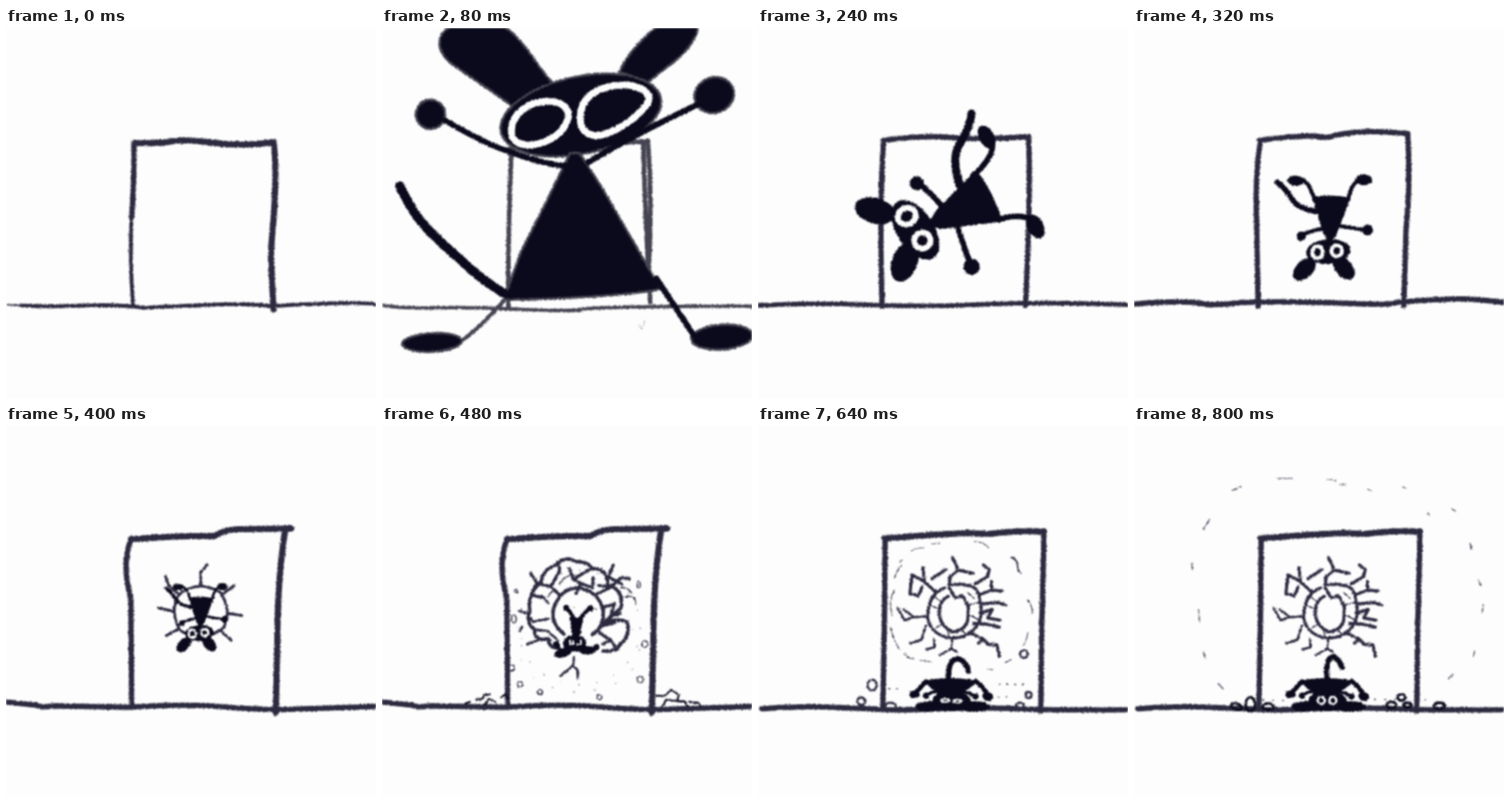
Animation of 480 by 480 pixels, one loop 0.88 s. Source, as an HTML page:

```html
<!DOCTYPE html>
<html lang="en">
<head>
<meta charset="utf-8">
<title>Wall splat</title>
<style>
  html, body { margin: 0; width: 100%; height: 100%; overflow: hidden; background: #fdfdfd; }
  svg { display: block; width: 100vw; height: 100vh; }
  .pose {
    fill: none; stroke: #2c2a3f; stroke-width: 7;
    stroke-linecap: round; stroke-linejoin: round;
    filter: url(#pencil); visibility: hidden;
    animation: show 880ms step-end infinite;
    animation-delay: calc(var(--i) * 80ms - 880ms);
  }
  @keyframes show { 0% { visibility: visible } 9.0909%, 100% { visibility: hidden } }
  .ink { stroke: #0b0a1c; }
  .fill { fill: #0b0a1c; stroke: none; }
  .white { stroke: #fdfdfd; }
  .faint { stroke: #454451; }
  .thin { stroke-width: 1.6; }
  .dust { stroke-width: 1.2; }
</style>
</head>
<body>
<svg viewBox="0 0 480 480">
  <defs>
    <filter id="pencil" filterUnits="userSpaceOnUse" x="0" y="0" width="480" height="480" color-interpolation-filters="sRGB">
      <feTurbulence type="fractalNoise" baseFrequency=".5" numOctaves="2" seed="4" result="n"/>
      <feDisplacementMap in="SourceGraphic" in2="n" scale="3.6" xChannelSelector="R" yChannelSelector="G"/>
      <feGaussianBlur stdDeviation=".8"/>
    </filter>

    <g id="diver" class="ink" stroke-width="5">
      <path class="fill" d="M231 219Q255 215 281 220L262 270L253 279L245 265Z"/>
      <path d="M245 260Q230 263 217 269M268 257L300 262M234 224Q228 198 214 195M278 222Q282 201 294 196"/>
      <path stroke-width="7" d="M236 238Q212 234 205 222Q195 206 186 200"/>
      <g class="fill">
        <circle cx="217" cy="270" r="6"/><circle cx="303" cy="262" r="7"/>
        <ellipse cx="210" cy="198" rx="11" ry="6.5"/><ellipse cx="298" cy="197" rx="11" ry="7"/>
        <ellipse cx="221" cy="313" rx="18" ry="11" transform="rotate(-46 221 313)"/>
        <ellipse cx="272" cy="311" rx="18" ry="11" transform="rotate(50 272 311)"/>
        <ellipse cx="252" cy="290" rx="29" ry="16" transform="rotate(-5 252 290)"/>
      </g>
      <g class="white">
        <ellipse cx="238" cy="291" rx="7" ry="8"/><ellipse cx="263" cy="289" rx="7" ry="7"/>
      </g>
    </g>

    <g id="lateWall" stroke-width="8">
      <path stroke-width="7" d="M165 146L164 250L162 367"/>
      <path d="M164 146Q200 143 230 141L270 139L300 140Q335 135 371 137"/>
      <path stroke-width="7" d="M371 136Q370 200 368 260L367 370"/>
      <path stroke-width="7" d="M5 367Q50 363 100 365T165 368T240 367T340 367T480 368"/>
    </g>

    <g id="crater" stroke-width="4">
      <path d="M251 206Q276 203 284 213Q294 240 286 256Q274 276 250 275Q224 271 220 249Q220 218 242 210"/>
      <path d="M248 210L256 223L265 220L273 234L272 254Q266 266 252 267Q236 260 235 242Q237 224 247 221"/>
      <path class="thin" d="M224 233L236 238M226 220L238 228M231 262L240 256M246 266L248 274M264 265L270 270M274 232L286 229M276 246L286 251M272 216L280 223"/>
      <path d="M230 215L216 202L200 193M216 202L214 184M200 193L197 218L208 220L213 209M226 198L244 186"/>
      <path d="M248 207L249 196L260 187L252 170M260 187L279 191M282 205L298 195L300 186L292 180M287 219L303 213L316 214M303 213L303 202"/>
      <path d="M289 231L310 229L321 232M288 243L304 238L298 249L314 252M280 256L296 257L313 261"/>
      <path d="M278 270L292 276L298 283L310 284L313 299M292 276L286 282"/>
      <path stroke-width="3" d="M220 247L202 248L189 238M202 248L190 252L181 236M218 259L212 277L198 282M228 276L229 287L218 290M252 278L251 289L258 293M251 289L236 297"/>
    </g>

    <g id="splat" class="ink" stroke-width="6">
      <path class="fill" d="M213 331Q248 323 286 331L268 345L264 355H236L230 344Z"/>
      <path d="M218 331Q211 340 203 347M282 331Q293 338 298 350"/>
      <path stroke-width="4" d="M238 346Q228 342 218 350M262 346Q274 344 282 352"/>
      <g class="fill">
        <ellipse cx="203" cy="348" rx="7" ry="5"/><ellipse cx="298" cy="351" rx="7" ry="5.5"/>
        <circle cx="218" cy="350" r="4"/><circle cx="282" cy="351" r="4"/>
        <ellipse cx="223" cy="364" rx="19" ry="7"/><ellipse cx="281" cy="364" rx="20" ry="7"/>
        <ellipse cx="251" cy="357" rx="25" ry="13"/>
      </g>
    </g>

    <g id="hitWall" stroke-width="8">
      <path stroke-width="7" d="M163 146Q149 176 162 224L163 363"/>
      <path d="M163 147Q230 142 270 143Q282 135 300 134L370 133"/>
      <path d="M362 136Q352 200 352 280L350 372"/>
      <path stroke-width="7" d="M0 358L38 362Q48 366 60 363L160 365Q240 359 300 366L350 368L480 364"/>
    </g>
  </defs>

  <g class="pose" style="--i:0">
    <path stroke-width="2" d="M2 359L22 360"/>
    <path stroke-width="5" d="M20 360Q55 362 100 360T180 363Q215 361 265 359T345 361Q385 358 430 357T480 359"/>
    <path d="M166 150Q166 210 163 245"/>
    <path stroke-width="5" d="M163 240Q160 300 165 360"/>
    <path stroke-width="8" d="M167 149Q200 150 215 147T270 149T347 148Q352 180 347 250Q343 290 344 305L347 365"/>
  </g>

  <g class="pose" style="--i:1">
    <g class="faint" stroke-width="6">
      <path stroke-width="4.5" d="M2 360Q30 364 70 363T180 365T260 365T400 361T480 362"/>
      <path d="M168 160Q163 260 164 362M164 157L344 147M339 148Q341 240 348 355M345 146Q351 230 346 310"/>
      <path stroke-width="5" d="M158 354Q128 388 103 406"/>
      <path stroke-width="1" stroke="#aaa" d="M334 385Q335 392 338 389L341 380"/>
    </g>
    <g class="faint" stroke-width="3" fill="#0b0a1c">
      <path d="M95 -5C65 8 73 30 86 43C110 62 145 82 172 104L222 72C200 50 190 20 155 -5Z"/>
      <path d="M308 57Q320 28 360 -5H409C413 8 396 31 376 46L345 70Z"/>
      <ellipse cx="258" cy="113" rx="106" ry="50" transform="rotate(-12 258 113)"/>
      <circle cx="63" cy="112" r="19"/>
      <ellipse cx="431" cy="87" rx="26" ry="23" transform="rotate(-20 431 87)"/>
      <path d="M244 162H256L284 205L362 339Q300 350 158 353L180 291L214 224Z"/>
      <ellipse cx="65" cy="408" rx="39" ry="12" transform="rotate(-3 65 408)"/>
      <ellipse cx="441" cy="401" rx="40" ry="16" transform="rotate(-4 441 401)"/>
    </g>
    <g class="ink" stroke-width="7.5">
      <path d="M82 120Q110 136 130 146T170 162Q210 177 240 179M268 174Q320 142 410 99M356 325L406 401"/>
      <path stroke-width="12" d="M158 344Q130 328 100 299Q55 260 43 241Q31 222 23 205"/>
    </g>
    <g class="white" stroke-width="9">
      <path d="M168 133C168 112 190 95 215 95C238 95 246 109 240 121C233 141 208 152 188 152C174 151 167 143 168 133Z"/>
      <path d="M258 108C262 86 286 73 318 74C342 77 352 88 343 100C325 122 300 137 278 140C260 138 255 126 258 108Z"/>
    </g>
  </g>

  <g class="pose" style="--i:2">
    <g class="faint" stroke-width="6">
      <path d="M2 361Q70 364 130 361T240 361T350 361T480 363"/>
      <path d="M160 234Q157 300 161 363M252 142Q300 134 348 146Q350 185 341 225Q338 260 346 300L344 358"/>
      <path d="M228 208Q190 242 160 252Q135 257 118 267"/>
    </g>
    <g class="fill">
      <path d="M200 4C184 4 181 35 182 58Q186 88 198 108L224 94C224 60 224 7 200 4Z"/>
      <path d="M158 157Q110 148 60 151C26 152 29 177 36 194Q60 201 150 198Z"/>
      <path d="M236 84C252 88 252 130 244 180C238 205 190 235 165 234C142 225 148 180 160 155C180 120 215 85 236 84Z"/>
      <circle cx="269" cy="69" r="15"/><circle cx="106" cy="273" r="16.5"/>
      <path d="M230 192Q290 196 344 222Q318 262 282 326H272Q255 250 230 192Z"/>
      <ellipse cx="432" cy="190" rx="13" ry="19" transform="rotate(15 432 190)"/>
      <ellipse cx="266" cy="405" rx="19" ry="14" transform="rotate(-8 266 405)"/>
    </g>
    <g class="ink" stroke-width="8">
      <path d="M238 190Q250 130 265 84M338 225Q370 220 420 202M276 318L277 392"/>
      <path stroke-width="9" d="M150 278Q165 312 200 325Q240 328 268 307"/>
    </g>
    <g class="white" stroke-width="8">
      <ellipse cx="217" cy="128" rx="30" ry="17" transform="rotate(-62 217 128)"/>
      <ellipse cx="181" cy="193" rx="30" ry="17" transform="rotate(-75 181 193)"/>
    </g>
  </g>

  <g class="pose" style="--i:3">
    <path stroke-width="6" d="M0 360Q70 356 140 359T280 359T400 357T480 359"/>
    <path d="M163 146Q157 230 161 361M163 146Q210 139 250 142T351 141Q354 220 347 360"/>
    <use href="#diver" transform="translate(248 242) rotate(62) scale(1.5) translate(-254 -258)"/>
  </g>

  <g class="pose" style="--i:4">
    <path d="M0 358Q65 353 85 357T140 356Q200 354 270 357T340 356Q415 350 440 352T480 356"/>
    <path d="M164 146Q157 190 159 250L161 361M163 146Q200 140 235 140Q250 144 262 139Q300 131 355 137Q359 200 353 260L350 360"/>
    <use href="#diver"/>
  </g>

  <g class="pose" style="--i:5">
    <use href="#hitWall"/>
    <g stroke-width="3.5">
      <path d="M224 219Q250 198 278 216Q294 240 282 262Q252 284 226 265Q212 242 224 219"/>
      <path d="M225 219L211 207L207 195M253 206L252 190L261 180M281 218L296 207M288 243L306 246M278 265L292 278M224 263L208 272M216 240L198 236"/>
    </g>
    <use href="#diver" transform="translate(252 248) scale(.65) translate(-254 -258)"/>
  </g>

  <g class="pose" style="--i:6">
    <use href="#hitWall"/>
    <g stroke-width="4.5">
      <path d="M206 204Q208 187 224 181Q238 167 252 176Q266 175 273 185Q292 184 293 206Q314 212 310 236L287 256Q302 248 318 254Q323 272 309 283Q305 293 287 292"/>
      <path d="M204 204Q188 220 192 240Q186 256 198 264Q197 280 216 276Q216 288 228 288"/>
      <path d="M236 270Q220 258 222 239Q230 211 254 210Q282 214 287 240Q288 262 272 271"/>
      <g stroke-width="4">
        <path d="M193 191L201 204L219 208L230 219M219 208L231 187L228 177M201 204L194 219L210 223M243 185L248 199L258 204L252 217M248 199L270 186M258 204L273 210L274 197"/>
        <path d="M277 219L297 209L310 197L321 198M297 209L281 207M300 180L294 196L311 205M288 235L302 231L296 247L309 243M286 259L302 255M282 268L297 278L305 290M297 278L286 283"/>
        <path stroke-width="3" d="M178 240L188 243L196 254L216 250M182 260L179 266M188 283L205 277L219 278M198 264L215 266L228 278M207 220L216 230"/>
        <path stroke-width="3" d="M249 300L248 311L232 324M248 311L254 317L254 327"/>
      </g>
      <path class="thin" d="M310 210Q318 208 324 217M316 222Q330 218 329 232M215 222Q220 212 228 214M230 205Q240 190 254 195"/>
    </g>
    <g class="ink" stroke-width="5">
      <path d="M250 254Q246 242 239 236M256 252Q262 242 269 237"/>
      <path stroke-width="4" d="M227 281L230 290M279 286L270 290"/>
      <g class="fill">
        <path d="M243 249H261L256 277H248Z"/>
        <circle cx="239" cy="236" r="4"/><circle cx="270" cy="237" r="4"/><circle cx="226" cy="283" r="4"/><circle cx="278" cy="287" r="4"/>
        <ellipse cx="250" cy="282" rx="15" ry="11"/>
        <ellipse cx="235" cy="294" rx="12" ry="6" transform="rotate(-18 235 294)"/>
        <ellipse cx="266" cy="291" rx="11" ry="5.5"/>
      </g>
      <path class="white" stroke-width="2.2" d="M244 278V283H248V279M254 283H258V278"/>
    </g>
    <g class="thin">
      <ellipse cx="171" cy="250" rx="3" ry="5"/><circle cx="168" cy="314" r="4"/><circle cx="179" cy="335" r="3.5"/>
      <circle cx="205" cy="345" r="3"/><circle cx="282" cy="352" r="3"/><circle cx="335" cy="329" r="4"/>
      <circle cx="341" cy="283" r="4"/><ellipse cx="333" cy="206" rx="2" ry="4"/><circle cx="174" cy="214" r="2"/>
      <ellipse cx="256" cy="262" rx="79" ry="74" stroke-width="1" stroke-dasharray="1 23"/>
      <ellipse cx="256" cy="290" rx="78" ry="55" stroke-width="1" stroke-dasharray="1 27"/>
    </g>
    <path class="ink" stroke-width="2.4" d="M108 360L114 358M122 355L130 354L132 349L140 348M134 361L139 354L147 358M155 352L160 348L164 353M356 350H367L375 342L385 349L383 357M364 363L369 355L382 357L392 357L396 363M398 358L410 359L413 363"/>
  </g>

  <g class="pose" style="--i:7">
    <use href="#lateWall"/>
    <use href="#crater"/>
    <use href="#diver" transform="translate(252 322) scale(.65 .6) translate(-254 -270)"/>
    <g stroke-width="2.5">
      <circle cx="157" cy="324" r="5"/><circle cx="176" cy="342" r="4"/><circle cx="203" cy="349" r="3"/>
      <circle cx="340" cy="280" r="4"/><circle cx="338" cy="333" r="4"/><circle cx="318" cy="350" r="3"/>
    </g>
    <ellipse class="dust" cx="257" cy="238" rx="76" ry="70" stroke-dasharray="12 22"/>
  </g>

  <g class="pose" style="--i:8">
    <use href="#lateWall"/>
    <use href="#crater"/>
    <use href="#splat"/>
    <path class="ink" d="M247 326Q247 302 260 302Q270 305 273 318"/>
    <g class="white" stroke-width="2.5"><ellipse cx="243" cy="356" rx="5" ry="2"/><ellipse cx="259" cy="357" rx="5" ry="2"/></g>
    <g stroke-width="3">
      <ellipse cx="148" cy="336" rx="6" ry="7"/><circle cx="134" cy="357" r="5"/><ellipse cx="172" cy="364" rx="7" ry="5"/>
      <circle cx="345" cy="296" r="5"/><circle cx="351" cy="349" r="4"/><ellipse cx="340" cy="363" rx="5" ry="4"/>
    </g>
    <path class="dust" d="M174 246Q169 225 177 213M177 197Q180 187 186 181M184 176L187 174M199 162Q205 158 215 158M226 153L236 152M281 150Q293 150 299 158M350 226Q356 233 356 243M350 268Q349 278 344 285M172 261Q175 277 183 289M190 296Q196 302 202 302M210 304L225 306M298 316H304M321 307L328 303"/>
    <path stroke-width="2" d="M329 170Q338 174 337 186L341 191"/>
    <path class="thin" stroke-dasharray="1 9" d="M170 341H190M313 335H347M312 352H330"/>
  </g>

  <g class="pose" style="--i:9">
    <use href="#lateWall"/>
    <use href="#crater"/>
    <use href="#splat"/>
    <path class="ink" d="M248 326Q248 301 260 301Q269 305 272 315"/>
    <g class="white" stroke-width="2.5"><ellipse cx="243" cy="356" rx="5" ry="2.5"/><ellipse cx="259" cy="356" rx="5" ry="2.5"/></g>
    <g stroke-width="3">
      <ellipse cx="150" cy="353" rx="6" ry="8"/><ellipse cx="133" cy="363" rx="6" ry="4"/><ellipse cx="173" cy="364" rx="7" ry="5"/>
      <circle cx="346" cy="335" r="5"/><ellipse cx="354" cy="359" rx="5" ry="4"/><ellipse cx="336" cy="363" rx="5" ry="4"/>
    </g>
    <path class="dust" stroke-dasharray="11 36" d="M150 326Q122 290 126 220Q128 135 180 118Q260 96 350 120Q410 145 408 225Q404 290 376 320"/>
  </g>

  <g class="pose" style="--i:10">
    <use href="#lateWall"/>
    <use href="#crater"/>
    <use href="#splat"/>
    <path class="ink" d="M250 326Q249 300 259 299Q266 303 270 313"/>
    <g class="white" stroke-width="3"><circle cx="243" cy="356" r="4.5"/><circle cx="258" cy="356" r="4.5"/></g>
    <g class="ink" stroke-width="3.5">
      <ellipse cx="133" cy="364" rx="7" ry="4" transform="rotate(20 133 364)"/><ellipse cx="151" cy="361" rx="6" ry="9"/>
      <ellipse cx="174" cy="364" rx="7" ry="4"/><ellipse cx="334" cy="362" rx="6" ry="4"/>
      <ellipse cx="347" cy="352" rx="5" ry="4"/><ellipse cx="355" cy="362" rx="5" ry="3"/><ellipse cx="396" cy="363" rx="7" ry="4"/>
    </g>
    <path class="dust" d="M127 84L140 78M186 68H206M250 69L262 71M267 76H274M303 82L308 84M348 79L353 81M381 113L383 116M412 107L417 111M90 134L98 121M75 178L76 186M84 238L85 254M90 293L92 301M109 334L115 341M436 152L438 160M447 200L450 207M453 232L452 242M442 292L440 299M408 328L414 322"/>
    <path class="thin" stroke-dasharray="1 12" d="M167 356H200M312 355H385"/>
  </g>
</svg>
</body>
</html>
```
